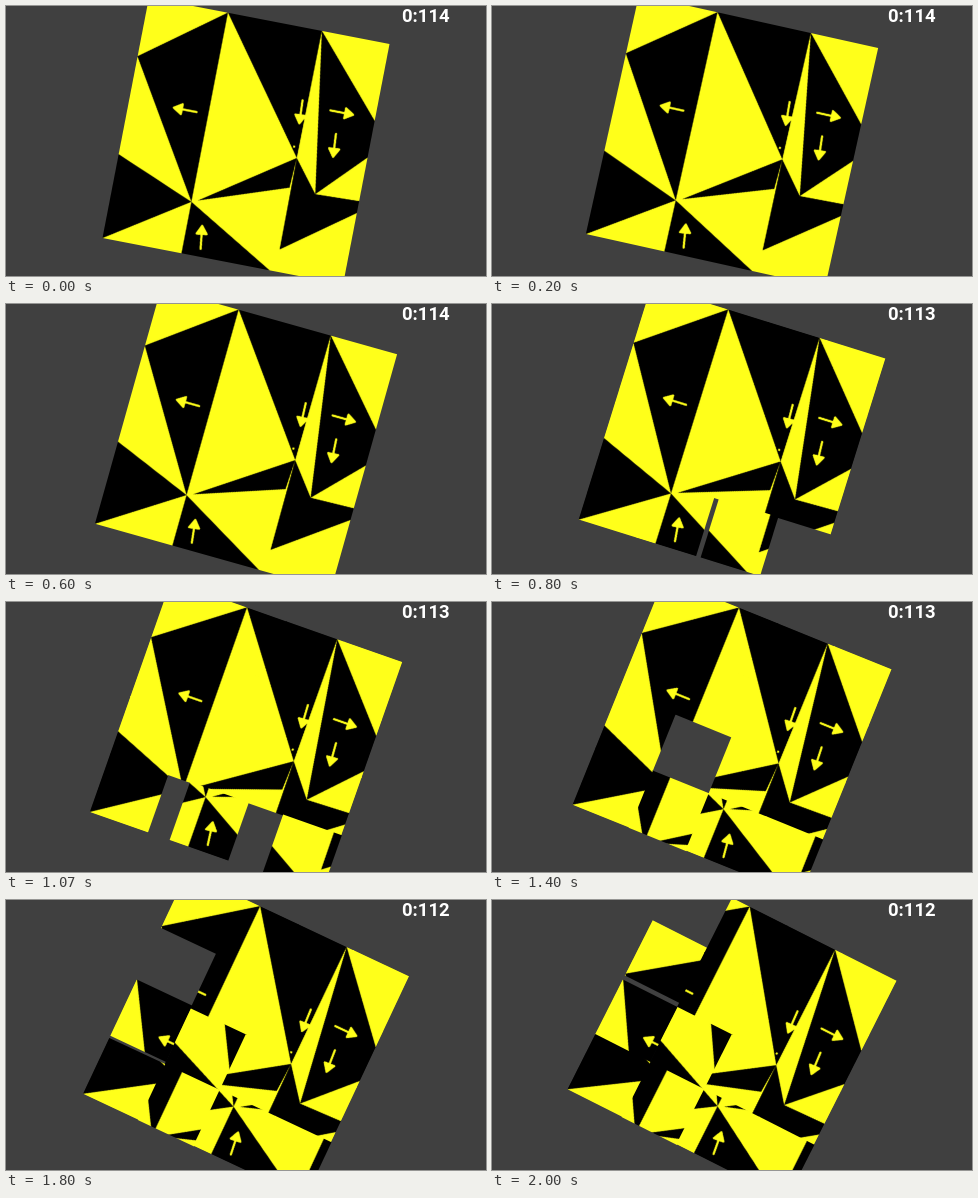
These frames come from a looping animation (480x270 px, 2070 ms). An HTML page with a canvas:

```html
<!DOCTYPE html>
<html lang="en">
<head>
<meta charset="utf-8">
<title>Turning slide puzzle</title>
<style>
  html, body { margin: 0; width: 100%; height: 100%; overflow: hidden; background: #404040; }
  canvas { display: block; width: 100vw; height: 100vh; }
</style>
</head>
<body>
<canvas id="stage"></canvas>
<script>
const W = 480, H = 270, LOOP = 2070, FPS = 15;
const GRAY = '#404040', YELLOW = '#ffff1a', BLACK = '#000';
const SIDE = 245, E = SIDE / 2, GRID = 4, TILE = SIDE / GRID;
const START_ANGLE = 10.94, DEGREES_PER_SECOND = 7.915;
const SLIDE_START = 11.72, SLIDE_FRAMES = 3.109, TIMER_STEP = 11;

// The blank's walk from the bottom right corner; tiles slide the other way.
const BLANK_PATH = 'LLULUU';
const STEP = { L: [0, -1], R: [0, 1], U: [-1, 0], D: [1, 0] };

const canvas = document.getElementById('stage');
const ctx = canvas.getContext('2d');

// The art lies on two upright lines, with its origin in the board's centre.
const LINE_A = -42, LINE_B = 53.5;
const peak = [LINE_A, -E], hub = [LINE_A, 70], foot = [LINE_A, E];
const notch = [LINE_B, -E], fork = [LINE_B - 0.5, 7], spike = [LINE_B, 100];
const knee = [78, 39];
const left = y => [-E, y], right = y => [E, y];

function shape(pen, ...points) {
  pen.beginPath();
  points.forEach(p => pen.lineTo(...p));
  pen.closePath();
  pen.fill();
}

function arrow(pen, tipX, tipY, degrees) {
  pen.save();
  pen.translate(tipX, tipY);
  pen.rotate(degrees * Math.PI / 180);
  pen.beginPath();
  pen.moveTo(-24, 0);
  pen.lineTo(-5, 0);
  pen.stroke();
  shape(pen, [-1, 0], [-9, -5], [-9, 5]);
  pen.stroke();
  pen.restore();
}

function paintArt() {
  const scale = 3;
  const art = document.createElement('canvas');
  art.width = art.height = SIDE * scale;
  const pen = art.getContext('2d');
  pen.scale(scale, scale);
  pen.translate(E, E);
  pen.fillStyle = YELLOW;
  pen.fillRect(-E, -E, SIDE, SIDE);

  pen.fillStyle = BLACK;
  shape(pen, left(-62.5), peak, hub);
  shape(pen, peak, notch, fork);
  shape(pen, notch, right(-44), right(-7), knee);
  shape(pen, [LINE_A + 6, 67.5], fork, [LINE_B - 2, 37.5]);
  shape(pen, fork, knee, right(37.5), right(49.5), spike);
  shape(pen, left(37), hub, left(E));
  shape(pen, hub, foot, [48, E]);

  pen.fillStyle = pen.strokeStyle = YELLOW;
  pen.lineWidth = 2.2;
  pen.lineCap = pen.lineJoin = 'round';
  arrow(pen, -78, -19, 180);
  arrow(pen, 49, -26.5, 87);
  arrow(pen, 101, -46, 0);
  arrow(pen, 88.5, 0, 86);
  arrow(pen, -27, 90.5, -97);
  pen.fillRect(47.2, -4.6, 2, 2);
  return art;
}

const art = paintArt();

function drawTile(row, col, dx, dy) {
  const lap = 0.5; // hides seams between neighbours
  ctx.save();
  ctx.translate(dx, dy);
  ctx.beginPath();
  ctx.rect(col * TILE - E - lap, row * TILE - E - lap, TILE + 2 * lap, TILE + 2 * lap);
  ctx.clip();
  ctx.drawImage(art, -E, -E, SIDE, SIDE);
  ctx.restore();
}

// Walks the blank and returns how far each passed tile has slid.
function slides(moves) {
  const shifts = {};
  let row = GRID - 1, col = GRID - 1;
  [...BLANK_PATH].forEach((key, n) => {
    const [down, across] = STEP[key];
    const amount = Math.max(0, Math.min(1, (moves - n) * 1.035)) * TILE;
    row += down;
    col += across;
    shifts[row * GRID + col] = [-across * amount, -down * amount];
  });
  return shifts;
}

function drawBoard(frame) {
  if (frame < SLIDE_START) {
    ctx.drawImage(art, -E, -E, SIDE, SIDE);
    return;
  }
  const shifts = slides((frame - SLIDE_START) / SLIDE_FRAMES);
  for (let i = 0; i < GRID * GRID - 1; i++) {
    const [dx, dy] = shifts[i] || [0, 0];
    drawTile(Math.floor(i / GRID), i % GRID, dx, dy);
  }
}

function drawTimer(frame) {
  const seconds = 114 - Math.floor((frame - TIMER_STEP + FPS) / FPS);
  ctx.font = 'bold 18.5px Roboto, sans-serif';
  ctx.textAlign = 'center';
  ctx.fillStyle = '#fff';
  ctx.fillText('0:' + seconds, 419.8, 15.6);
}

function fit() {
  const ratio = window.devicePixelRatio || 1;
  const w = Math.round(innerWidth * ratio), h = Math.round(innerHeight * ratio);
  if (canvas.width !== w || canvas.height !== h) {
    canvas.width = w;
    canvas.height = h;
  }
  ctx.setTransform(w / W, 0, 0, h / H, 0, 0);
  ctx.imageSmoothingQuality = 'high';
}

const start = performance.now();

function draw() {
  const t = Math.max(0, performance.now() - start) % LOOP;
  const frame = Math.floor((Math.floor(t / 10) * 10 + 4) * FPS / 1000);
  fit();
  ctx.fillStyle = GRAY;
  ctx.fillRect(0, 0, W, H);
  ctx.save();
  ctx.translate(W / 2, H / 2);
  ctx.rotate((START_ANGLE + DEGREES_PER_SECOND * frame / FPS) * Math.PI / 180);
  drawBoard(frame);
  ctx.restore();
  drawTimer(frame);
  requestAnimationFrame(draw);
}

draw();
</script>
</body>
</html>
```
